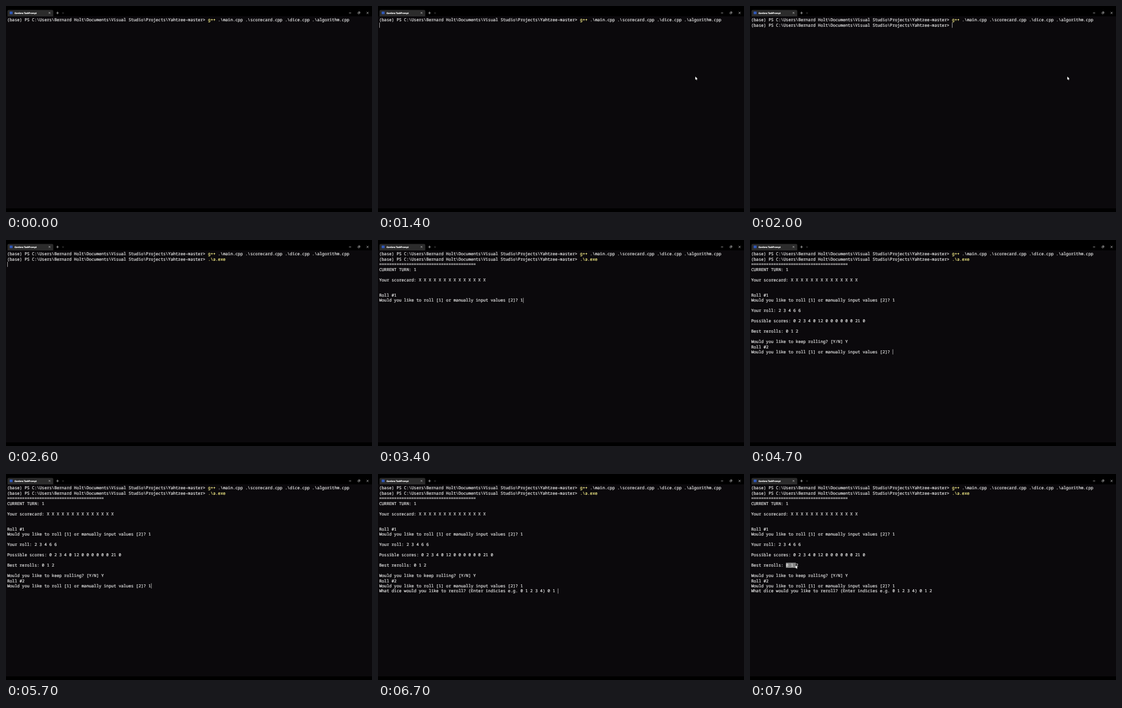
Recreate the animation shown at these times as an HTML page with a canvas. Size 600 by 338 pixels, loop 8000 ms.

```html
<!DOCTYPE html>
<html lang="en">
<head>
<meta charset="utf-8">
<title>Terminal session</title>
<style>
  html, body { margin: 0; width: 100%; height: 100%; overflow: hidden; background: #000; }
  canvas { display: block; width: 100vw; height: 100vh; }
</style>
</head>
<body>
<canvas id="stage"></canvas>
<script>
const W = 600, H = 338, LOOP = 8000, STEP = 100, BLINK = 300;
const CELL = 4.066, ROW = 8.45, LEFT = 2, TOP = 18.8, BASE = 6.6;
const MONO = '6.777px "Noto Sans Mono", "DejaVu Sans Mono", monospace';
const TITLE = '600 3.6px "Open Sans", "Noto Sans", sans-serif';
const FG = '#dedede', YELLOW = '#f6ee88', BG = '#0b090c';

const canvas = document.getElementById('stage');
const ctx = canvas.getContext('2d');

const prompt = '(base) PS C:\\Users\\Bernard Holt\\Documents\\Visual Studio\\Projects\\Yahtzee-master> ';
const rollAsk = 'Would you like to roll [1] or manually input values [2]? ';
const firstTurn = `${'='.repeat(39)}
CURRENT TURN: 1

Your scorecard:${' X'.repeat(14)}


Roll #1
${rollAsk}`;
const result = `

Your roll: 2 3 4 6 6

Possible scores: 0 2 3 4 0 12 0 0 0 0 0 0 21 0

Best rerolls: 0 1 2

Would you like to keep rolling? [Y/N] `;

// What reaches the screen and when; each arrival restarts the caret blink.
const session = [
  [-BLINK, prompt + 'g++ .\\main.cpp .\\scorecard.cpp .\\dice.cpp .\\algorithm.cpp'],
  [800, '\n'],
  [1900, prompt],
  [2200, '.'], [2300, '\\'], [2400, 'a'], [2500, '.exe'], [2600, '\n'],
  [2900, firstTurn],
  [3400, '1'],
  [3600, result],
  [4500, 'Y'],
  [4700, '\nRoll #2\n' + rollAsk],
  [5700, '1'],
  [6000, '\nWhat dice would you like to reroll? (Enter indicies e.g. 0 1 2 3 4) '],
  [6500, '0'], [6600, ' 1'], [6700, ' '], [6800, '2']
];

const colX = col => LEFT + col * CELL;
const rowY = row => TOP + row * ROW;
const SELECT_ROW = 15, SELECT_COL = 14, DRAG_START = 7600;

function box(x, y, w, h, color) {
  ctx.fillStyle = color;
  ctx.fillRect(x, y, w, h);
}

// The thin outline gives the strokes a little more weight.
function write(text, x, y, font, color) {
  ctx.font = font;
  ctx.fillStyle = ctx.strokeStyle = color;
  ctx.lineWidth = 0.22;
  ctx.lineJoin = 'round';
  ctx.strokeText(text, x, y);
  ctx.fillText(text, x, y);
}

function line(d, color, width = 0.65) {
  ctx.strokeStyle = color;
  ctx.lineWidth = width;
  ctx.stroke(new Path2D(d));
}

function drawWindow() {
  box(0, 0, W, H, '#000');
  box(0, 17, W, 315, BG);
  ctx.fillStyle = '#2c2c2c';
  ctx.beginPath();
  ctx.roundRect(2.5, 6.5, 75, 10.5, [2, 2, 0, 0]);
  ctx.fill();
  box(6, 9.2, 4.8, 4.2, '#3159b8');
  write('Gardens TaskPrompt', 14, 12.8, TITLE, '#fff');
  line('M70 10l2.7 2.7m0 -2.7l-2.7 2.7', '#d0d0d0');
  line('M82.4 11.4h4.2m-2.1 -2.1v4.2', '#d8d8d8');
  line('M92.3 11l1.2 1l1.2 -1', '#a0a0a0');
  line('M562.3 11.4h3.5', '#d8d8d8');
  line('M577 10.4h2.4v2.4h-2.4zM577.8 9.6h2.4v2.4', '#d8d8d8', 0.55);
  line('M591.2 9.8l3.1 3.1m0 -3.1l-3.1 3.1', '#e0e0e0');
}

function drawLine(text, row) {
  const y = rowY(row) + BASE;
  const put = (part, col, color = FG) => write(part, colX(col), y, MONO, color);
  if (!text.startsWith(prompt)) return put(text, 0);
  const [command] = text.slice(prompt.length).split(' ');
  const end = prompt.length + command.length;
  put(prompt, 0);
  put(command, prompt.length, YELLOW);
  put(text.slice(end), end);
}

function drawTerminal(t) {
  const shown = session.filter(([at]) => at <= t);
  const lines = shown.map(([, text]) => text).join('').split('\n');
  lines.forEach(drawLine);

  const idle = t - shown.at(-1)[0];
  if (Math.floor(idle / BLINK) % 2 === 0) {
    const row = lines.length - 1;
    box(colX(lines[row].length), rowY(row), 0.7, ROW, '#d0d0d0');
  }
}

// Eased travel between two points, clamped at both ends.
function glide(t, from, to, [x0, y0], [x1, y1]) {
  const p = Math.min(1, Math.max(0, (t - from) / (to - from)));
  const k = p * p * (3 - 2 * p);
  return [x0 + (x1 - x0) * k, y0 + (y1 - y0) * k];
}

function pointerAt(t) {
  if (t >= 300 && t < 2200) return glide(t, 300, 500, [522, 122], [520.2, 115.8]);
  if (t < 7200) return null;
  const grab = [colX(SELECT_COL) + 1, 149.7];
  if (t < DRAG_START) return glide(t, 7200, DRAG_START, [452, 165], grab);
  return glide(t, DRAG_START, 7900, grab, [colX(SELECT_COL + 4) - 0.6, 149.7]);
}

function drawSelection(t, pointer) {
  if (t <= DRAG_START) return;
  const cells = Math.round((pointer[0] - colX(SELECT_COL)) / CELL);
  box(colX(SELECT_COL), rowY(SELECT_ROW), cells * CELL, ROW, '#858585');
}

function drawPointer([x, y]) {
  const arrow = new Path2D('M0 0V17L4 13.2L6.6 19L9.4 17.8L6.9 12.2H12Z');
  ctx.save();
  ctx.translate(x, y);
  ctx.scale(0.3125, 0.3125);
  ctx.lineWidth = 1.4;
  ctx.strokeStyle = '#000';
  ctx.stroke(arrow);
  ctx.fillStyle = '#fff';
  ctx.fill(arrow);
  ctx.restore();
}

function draw(t) {
  const pointer = pointerAt(t);
  ctx.setTransform(canvas.width / W, 0, 0, canvas.height / H, 0, 0);
  ctx.textRendering = 'geometricPrecision';
  drawWindow();
  drawSelection(t, pointer);
  drawTerminal(t);
  if (pointer) drawPointer(pointer);
}

function resize() {
  const dpr = window.devicePixelRatio || 1;
  canvas.width = Math.round(innerWidth * dpr);
  canvas.height = Math.round(innerHeight * dpr);
}

const start = performance.now();
function tick() {
  const t = (performance.now() - start) % LOOP;
  draw(Math.floor(t / STEP) * STEP);
  requestAnimationFrame(tick);
}

addEventListener('resize', resize);
resize();
tick();
</script>
</body>
</html>
```
